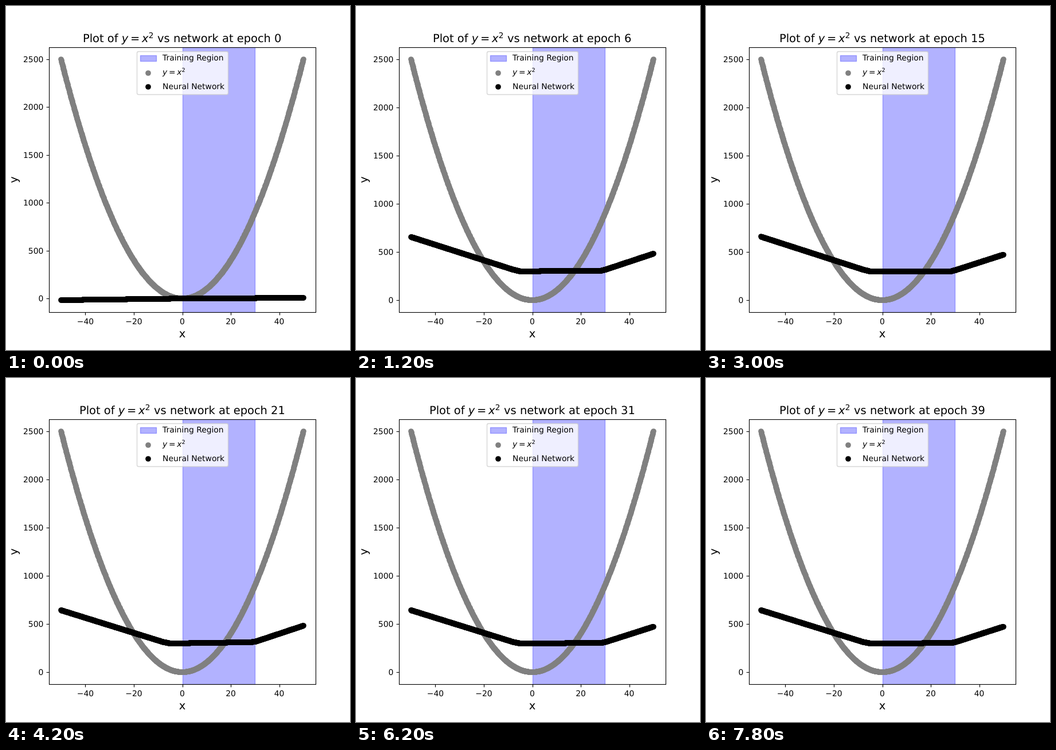
These frames come from a looping animation (600 by 600 pixels, 8 s). An HTML page with a canvas:

```html
<!DOCTYPE html>
<html lang="en">
<head>
<meta charset="utf-8">
<title>Network fit by epoch</title>
<style>
  html, body { margin: 0; width: 100%; height: 100%; overflow: hidden; background: #fff; }
  svg, canvas { position: absolute; left: 0; top: 0; width: 600px; height: 600px; }
  text { font: 13.889px "DejaVu Sans", sans-serif; text-rendering: geometricPrecision; white-space: pre; }
  .big text, text.big { font-size: 19.444px; }
  .math { font-style: italic; }
  .big .sup { font-size: 13.611px; }
  .sup { font-size: 9.722px; }
  .mid { text-anchor: middle; }
  .end { text-anchor: end; }
  .band { fill: rgba(0,0,255,.3); stroke: rgba(0,0,255,.3); stroke-width: 1.39; }
  .line { fill: none; stroke: #000; stroke-width: 1.11; }
</style>
</head>
<body>
<svg viewBox="0 0 600 600">
  <clipPath id="plot"><rect x="75" y="72" width="465" height="462"/></clipPath>
  <rect class="band" x="308.5" y="60" width="126" height="490" clip-path="url(#plot)"/>
</svg>
<canvas id="curves" width="600" height="600"></canvas>
<svg viewBox="0 0 600 600">
  <rect class="line" x="75.5" y="72.5" width="465" height="462" stroke-linecap="square"/>
  <g id="xTicks"></g>
  <g id="yTicks"></g>
  <text class="big mid" x="307.5" y="578">x</text>
  <text class="big mid" transform="translate(20 303) rotate(-90)">y</text>

  <g id="title" class="big">
    <text y="63">Plot of </text>
    <text class="math" x="67.75" y="63">y</text>
    <text x="83" y="63">=</text>
    <text class="math" x="103.1" y="63">x</text>
    <text class="sup" x="114.8" y="56">2</text>
    <text id="epoch" x="123.9" y="63"></text>
  </g>

  <rect x="228.5" y="79.5" width="159" height="75" rx="2.8" fill="#fff" fill-opacity=".8"
        stroke="#ccc" stroke-opacity=".8" stroke-width="1.39"/>
  <rect class="band" x="234.5" y="86.5" width="28" height="10"/>
  <circle cx="248" cy="117" r="4.86" fill="#808080"/>
  <circle cx="248" cy="141" r="4.86"/>
  <text x="273" y="95">Training Region</text>
  <text class="math" x="273" y="120">y</text>
  <text x="283.9" y="120">=</text>
  <text class="math" x="298.3" y="120">x</text>
  <text class="sup" x="306.6" y="115">2</text>
  <text x="273" y="145">Neural Network</text>
</svg>
<script>
const EPOCHS = 40, EPOCH_MS = 200, POINTS = 1000;
const $ = id => document.getElementById(id);
const ctx = $("curves").getContext("2d");

// Network output at the knots, for a few epochs.
const knots = [-50, -8, -5, 28.5, 30.5, 50];
const poses = [
  [0,  [-15.9, -1.9, -0.9, 4.7, 5.1, 8.5]],
  [6,  [655, 317, 299, 305.5, 319, 482]],
  [15, [658, 317, 298, 300, 314, 472]],
  [21, [642, 313, 297.5, 310.5, 319, 482]],
  [26, [642, 313, 297, 303.5, 315, 473]],
  [35, [642, 313, 297.5, 303, 314, 470]],
  [39, [642, 313, 298, 302, 314, 472]]
];

const mix = (a, b, k) => a + (b - a) * k;

function networkAt(epoch) {
  const i = Math.max(1, poses.findIndex(p => p[0] >= epoch));
  const [e0, from] = poses[i - 1], [e1, to] = poses[i];
  let k = (epoch - e0) / (e1 - e0);
  if (i === 1) k = (1 - Math.exp(-0.9 * epoch)) / (1 - Math.exp(-0.9 * e1));
  const values = from.map((v, j) => mix(v, to[j], k));
  return x => {
    let j = 1;
    while (j < knots.length - 1 && x > knots[j]) j++;
    return mix(values[j - 1], values[j], (x - knots[j - 1]) / (knots[j] - knots[j - 1]));
  };
}

const toX = x => 307.5 + x * 465 / 110;

// Markers sit on whole pixels.
function scatter(fn, toY, color) {
  ctx.fillStyle = color;
  for (let i = 0; i < POINTS; i++) {
    const x = -50 + 100 * i / (POINTS - 1);
    ctx.beginPath();
    ctx.arc(Math.round(toX(x)), Math.round(toY(fn(x))), 4.86, 0, 2 * Math.PI);
    ctx.fill();
  }
}

const label = v => String(v).replace("-", "\u2212");

$("xTicks").innerHTML = [-40, -20, 0, 20, 40].map(v => {
  const x = Math.round(toX(v)) + 0.5;
  return `<path class="line" d="M${x} 534.5v4.9"/><text class="mid" x="${toX(v)}" y="555">${label(v)}</text>`;
}).join("");

function draw(epoch) {
  const network = networkAt(epoch);
  const low = Math.min(0, network(-50));
  const toY = v => 93 + 420 * (2500 - v) / (2500 - low);

  ctx.clearRect(0, 0, 600, 600);
  scatter(x => x * x, toY, "#808080");
  scatter(network, toY, "#000");

  $("yTicks").innerHTML = [0, 500, 1000, 1500, 2000, 2500].map(v => {
    const y = Math.round(toY(v));
    return `<path class="line" d="M75.5 ${y + 0.5}h-4.9"/><text class="end" x="65.3" y="${y + 5}">${v}</text>`;
  }).join("");
  $("epoch").textContent = " vs network at epoch " + epoch;
  $("title").setAttribute("transform", `translate(${epoch < 10 ? 134 : 128} 0)`);
}

let shown = -1;
function tick() {
  const epoch = Math.floor(performance.now() / EPOCH_MS) % EPOCHS;
  if (epoch !== shown) draw(shown = epoch);
  requestAnimationFrame(tick);
}
tick();
</script>
</body>
</html>
```
